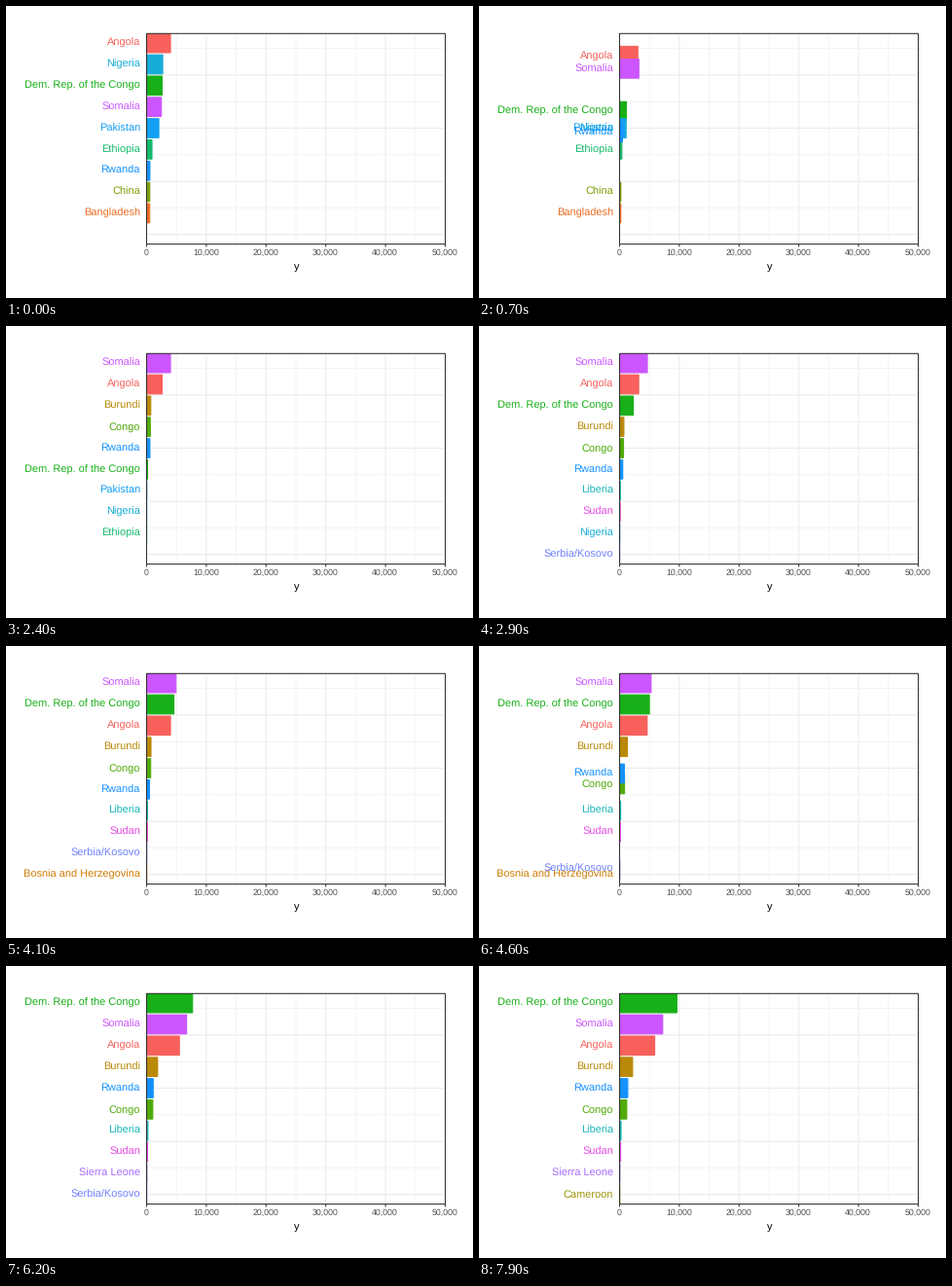
A matplotlib script that plays this animation: 480 by 300 pixels, repeating every 8000 ms.

```python
import matplotlib
import matplotlib.pyplot as plt
from matplotlib.animation import FuncAnimation
from matplotlib.patches import Rectangle

matplotlib.rcParams["font.family"] = "Liberation Sans"
matplotlib.rcParams["text.hinting"] = "none"

W, H, STEP, LOOP = 480, 300, 100, 8000
LEFT, RIGHT, TOP, UNIT = 144.5, 451.5, 28.3, 21.85
BOTTOM = TOP + 9.9 * UNIT
X_MAX, STROKE = 50000, 1.07
GRID, DARK = "#ebebeb", "#333333"

COLORS = {
    "Angola": "#f8605b",
    "Bangladesh": "#ee6c20",
    "Bosnia and Herzegovina": "#d07d08",
    "Burundi": "#b98909",
    "Cameroon": "#9c9509",
    "China": "#7ca009",
    "Congo": "#50aa09",
    "Dem. Rep. of the Congo": "#18b018",
    "Ethiopia": "#16b96c",
    "Liberia": "#18b5b8",
    "Nigeria": "#17acd8",
    "Pakistan": "#14a0f3",
    "Rwanda": "#1592ff",
    "Serbia/Kosovo": "#6f82ff",
    "Sierra Leone": "#a66bff",
    "Somalia": "#cc55ff",
    "Sudan": "#e74ae4",
}
DRC, BOSNIA = "Dem. Rep. of the Congo", "Bosnia and Herzegovina"
SERBIA, SIERRA = "Serbia/Kosovo", "Sierra Leone"

# Each state lists its countries from first to last place.
STATES = [
    {"Angola": 4000, "Nigeria": 2700, DRC: 2600, "Somalia": 2480,
     "Pakistan": 2050, "Ethiopia": 900, "Rwanda": 560, "China": 540,
     "Bangladesh": 520},
    {"Somalia": 3720, "Angola": 2430, "Burundi": 500, "Rwanda": 430,
     DRC: 170, "Ethiopia": 40, "Nigeria": 30},
    {"Somalia": 4000, "Angola": 2600, "Burundi": 700, "Congo": 620,
     "Rwanda": 560, DRC: 170, "Pakistan": 40, "Nigeria": 30, "Ethiopia": 20},
    {"Somalia": 4650, "Angola": 3200, DRC: 2300, "Burundi": 720,
     "Congo": 660, "Rwanda": 530, "Liberia": 130, "Sudan": 100,
     "Nigeria": 40, SERBIA: 20},
    {"Somalia": 4930, DRC: 4570, "Angola": 4000, "Burundi": 740,
     "Congo": 690, "Rwanda": 490, "Liberia": 160, "Sudan": 120,
     SERBIA: 40, BOSNIA: 30},
    {"Somalia": 5390, DRC: 5130, "Angola": 4830, "Burundi": 1500,
     "Rwanda": 900, "Congo": 880, "Liberia": 190, "Sudan": 140,
     SIERRA: 50, SERBIA: 40},
    {DRC: 7200, "Somalia": 6600, "Angola": 5430, "Burundi": 1780,
     "Rwanda": 1060, "Congo": 1010, "Liberia": 220, "Sudan": 160,
     SIERRA: 60, SERBIA: 40},
    {DRC: 9200, "Somalia": 7000, "Angola": 5700, "Burundi": 2060,
     "Rwanda": 1260, "Congo": 1130, "Liberia": 240, "Sudan": 170,
     SIERRA: 60, "Cameroon": 50},
    {DRC: 9600, "Somalia": 7220, "Angola": 5880, "Burundi": 2180,
     "Rwanda": 1370, "Congo": 1200, "Liberia": 250, "Sudan": 180,
     SIERRA: 60, "Cameroon": 50},
]
# The first move is long, the rest take 400 ms out of every 900 ms.
MOVES = [(100, 1100)] + [(700 + 900 * k, 1100 + 900 * k) for k in range(1, 8)]


def px(value):
    return LEFT + (RIGHT - LEFT) * value / X_MAX


def py(rank):
    return TOP + (rank - 0.55) * UNIT


def ranked(state):
    return {name: (rank, value)
            for rank, (name, value) in enumerate(state.items(), 1)}


PLACES = [ranked(state) for state in STATES]


def layout(ms):
    """Rank and value of every visible country at a time."""
    for k, (start, end) in enumerate(MOVES):
        if ms < end:
            break
    else:
        return PLACES[-1]
    t = max(0, (ms - start) / (end - start))
    now, after = PLACES[k], PLACES[k + 1]
    result = {}
    for name, (rank, value) in now.items():
        rank2, value2 = after.get(name, (rank, 0))
        result[name] = (rank + t * (rank2 - rank), value + t * (value2 - value))
    return result


fig = plt.figure(figsize=(W / 72, H / 72), dpi=72, facecolor="white")
ax = fig.add_axes([0, 0, 1, 1])
ax.set_xlim(0, W)
ax.set_ylim(H, 0)
ax.axis("off")


def line(x0, y0, x1, y1, color, width=STROKE, z=1):
    ax.plot([x0, x1], [y0, y1], color=color, lw=width, zorder=z,
            solid_capstyle="butt", snap=False)


def grid_width(i):
    return STROKE / 2 if i % 2 else STROKE


for i in range(1, 10):
    line(px(5000 * i), TOP, px(5000 * i), BOTTOM, GRID, grid_width(i))
for i in range(1, 9):
    line(LEFT, py(1.25 * i), RIGHT, py(1.25 * i), GRID, grid_width(i))
for v in range(0, X_MAX + 1, 10000):
    line(px(v), BOTTOM, px(v), BOTTOM + 2.8, DARK, z=5)
    ax.text(px(v) - 0.5, 256, f"{v:,}", size=8.8, color="#4d4d4d",
            ha="center", va="baseline")
ax.text((LEFT + RIGHT) / 2 + 0.3, 271.4, "y", size=11, color="black",
        ha="center", va="baseline")
panel = ax.add_patch(Rectangle((LEFT, TOP), RIGHT - LEFT, BOTTOM - TOP,
                               fill=False, ec=DARK, lw=STROKE, zorder=6,
                               snap=False))

bars, labels = {}, {}
for name, color in COLORS.items():
    bars[name] = ax.add_patch(Rectangle((LEFT, 0), 0, 0.9 * UNIT, fc=color,
                                        ec=color, lw=STROKE, zorder=3,
                                        snap=False))
    bars[name].set_clip_path(panel)
    labels[name] = ax.text(137.9, 0, name, size=11.04, color=color,
                           ha="right", va="baseline", zorder=4)


def draw(i):
    shown = layout(i * STEP)
    for name in COLORS:
        visible = name in shown
        bars[name].set_visible(visible)
        labels[name].set_visible(visible)
        if visible:
            rank, value = shown[name]
            bars[name].set_y(py(rank - 0.45))
            bars[name].set_width(px(value) - LEFT)
            labels[name].set_y(py(rank) + 3.05)
    return [*bars.values(), *labels.values()]


anim = FuncAnimation(fig, draw, frames=LOOP // STEP, interval=STEP,
                     repeat=True, repeat_delay=0, blit=False)
plt.show()
```
